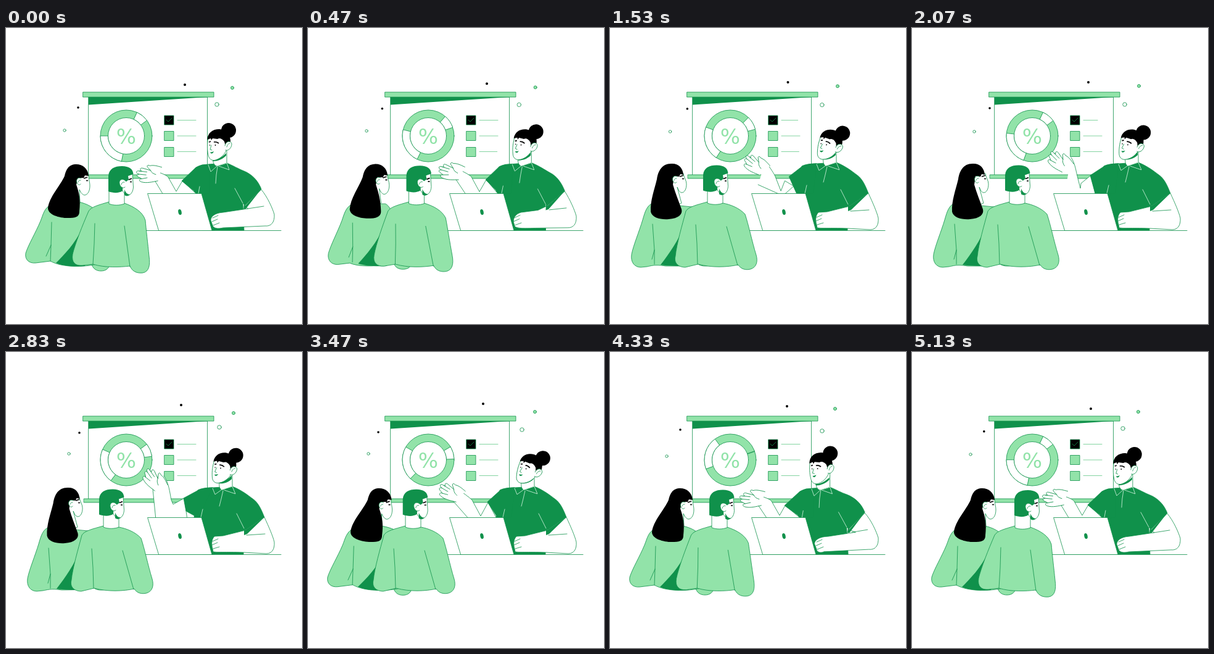
Write an HTML page that moves like this. It is 480 px wide and 480 px high and loops after 5.17 s.

```html
<!DOCTYPE html>
<html lang="en">
<head>
<meta charset="utf-8">
<title>Presentation</title>
<style>
html, body { margin: 0; width: 100%; height: 100%; overflow: hidden; background: #fff; }
svg { display: block; width: 100vw; height: 100vh; }
.s { stroke: #10914b; stroke-width: .8; stroke-linejoin: round; stroke-linecap: round; }
.w { fill: #fff; }
.l { fill: #92e3a9; }
.d { fill: #10914b; }
.k { fill: #000; }
.n { fill: none; }
.c { stroke: #d9f6e2; }
.b { stroke: #000; stroke-width: 1.7; }
text { font: 34px "DejaVu Sans", sans-serif; text-anchor: middle; }
</style>
</head>
<body>
<svg viewBox="0 0 480 480">
  <!-- screen -->
  <path class="w s" d="M134 112H326.5V240H134Z"/>
  <path class="d" d="M134 112H326L134 124.5Z"/>
  <path class="l s" d="M125 104H337V112H125ZM126.500 238H337V244H126.500Z"/>
  <circle class="l s" cx="195" cy="175" r="42"/>
  <path class="w s" id="gap1"/><path class="w s" id="gap2"/>
  <circle class="w s" cx="195" cy="175" r="29.5"/>
  <text class="l" x="195" y="187.5">%</text>
  <path class="k s" d="M257 142h15v15h-15Z"/>
  <path class="l s" d="M257 167.500h15v15h-15ZM257 193.500h15v15h-15Z"/>
  <path class="n s" d="M260 149l3 3 6-6"/>
  <path class="n s" id="rows" style="stroke:#65c98a"/>

  <!-- floating dots -->
  <circle class="k" id="dot1" r="2"/><circle class="l s" id="dot2" r="2.5"/>
  <circle class="w s" id="dot3" r="3.200"/><circle class="k" id="dot4" r="1.800"/>
  <circle class="w s" id="dot5" r="2.200"/>

  <!-- presenter -->
  <path class="d s" id="torso"/>
  <path class="w s" id="arm"/>
  <path class="d s" id="sleeve"/>
  <path class="w s" id="neck"/>
  <path class="d" id="neckShade"/>
  <path class="n s c" id="seams"/>
  <g id="hand">
    <path class="w s" d="M-6 4C-10-4-15-12-15-21C-15-26-11-26-10-22L-9-26C-9-32-5-32-4-28L-4-30C-3-35 1-34 1-29L2-26C4-30 7-29 7-25L7-12L10-17C12-21 15-19 14-15C17-10 17-3 17 4"/>
    <path class="n s" d="M7-12C4-10 3-6 3-2M-10-22L-6-14M-4-28L-2-17M1-29L3-17"/>
  </g>
  <g id="head">
    <circle class="k" cx="361" cy="166" r="12"/>
    <path class="w s" d="M328 176C326 188 326 197 328 206C329 212 333 215 338 214.500C346 213 353 207 357 199L360 176Z"/>
    <path class="k" d="M326.500 181C327 170 335 164 346 164C358 165 365 173 364 187L357 195L354 184C350 179 346 178 343 180L335 179L333 182L332 179Z"/>
    <path class="w s" d="M355 191C356 183 365 182 366 188C366 194 361 200 356 198"/>
    <path class="n s" d="M358 193C359 189 361 187 363 187M333 190L331 197L334 198"/>
    <path class="n b" d="M337 185Q341 184 345 187M329 185L332 184"/>
    <circle class="k" cx="339.500" cy="190" r=".9"/><circle class="k" cx="330.500" cy="190" r=".8"/>
    <path class="d" d="M331 201.500Q334 201.500 337 200Q335 205 332 203Z"/>
  </g>

  <!-- table and laptop -->
  <path class="n s" d="M225 328.500H446"/>
  <path class="d s" d="M316 268L321 269L338 328H332Z"/>
  <path class="w s" d="M230 268.500H317L334 328.500H248Z"/>
  <ellipse class="d" cx="282" cy="298.500" rx="2.700" ry="4.600" transform="rotate(-12 282 298.500)"/>
  <path class="w s" id="rest"/>
  <path class="d" id="cuff"/>
  <path class="n s" id="restLines"/>

  <!-- audience: woman -->
  <path class="l s" id="wElbow"/>
  <path class="l s" id="wBody"/>
  <path class="d" id="wShade"/>
  <path class="n s" id="wLines"/>
  <path class="w s" id="wFace"/>
  <path class="k" id="wHair"/>
  <g id="wDetail">
    <path class="w s" d="M122 244C117 241 113 246 115 251C117 255 120 255 121 253"/>
    <path class="n s" d="M117 250Q118 246 121 247"/>
    <path class="n b" d="M126 244L132 242M130 247.500H133"/>
  </g>

  <!-- audience: man -->
  <path class="l s" id="mBody"/>
  <path class="n s" id="mLines"/>
  <path class="w s" id="mNeck"/>
  <g id="mHead">
    <path class="w s" d="M185 240L205 236L206.500 258C206 267 201 273 194 271L189 264Z"/>
    <path class="d" d="M192 262C194 267 197 270 201 270C198 273 195 273 192 271Z"/>
    <path class="d" d="M166 265V240C167 228 176 224 188 224C200 224 206 229 206.500 237L198 240L199 246L195 249L190 247L189 264C184 268 174 268 166 265Z"/>
    <path class="w s" d="M194 248C189 243 183 246 184 252C185 258 190 261 193 258"/>
    <path class="n s" d="M187 254Q188 249 192 250"/>
    <path class="n b" d="M199 246L204 244M201 249.500H204"/>
  </g>
</svg>
<script>
const LOOP = 5170;
const POSES = [0, 1030, 2070, 2830, 3470, 4330];
const $ = id => document.getElementById(id);
const NUM = /-?\d+(\.\d+)?/g;
const nums = s => String(s).match(NUM).map(Number);

// Periodic curve through keys; flat at extremes so it never overshoots.
function curve(vals, times = POSES) {
  const n = vals.length;
  const val = i => vals[(i + n) % n];
  const time = i => times[(i + n) % n] + LOOP * Math.floor(i / n);
  const rate = i => (val(i + 1) - val(i)) / (time(i + 1) - time(i));
  const slope = i => {
    const a = rate(i - 1), b = rate(i);
    return a * b <= 0 ? 0 : 2 * a * b / (a + b);
  };
  return t => {
    let i = n - 1;
    while (times[i] > t) i--;
    const h = time(i + 1) - time(i), u = (t - time(i)) / h, v = 1 - u;
    return val(i) * v * v * (1 + 2 * u) + val(i + 1) * u * u * (3 - 2 * u)
      + h * u * v * (slope(i) * v - slope(i + 1) * u);
  };
}

// Strings of the same shape, one per pose.
function keyed(...strings) {
  const rows = strings.map(nums);
  const curves = rows[0].map((_, k) => curve(rows.map(r => r[k])));
  return t => {
    let k = 0;
    return strings[0].replace(NUM, () => curves[k++](t).toFixed(2));
  };
}

// Blend of two strings, steered by a weight curve.
function blend(weight, from, to) {
  const a = nums(from), b = nums(to);
  return t => {
    const w = weight(t);
    const mixed = a.map((v, k) => v + (b[k] - v) * w);
    let k = 0;
    return from.replace(NUM, () => mixed[k++].toFixed(2));
  };
}

function ringGap(from, to) {
  const a = curve(from), b = curve(to);
  const at = (deg, r) => {
    const q = deg * Math.PI / 180;
    return `${195 + r * Math.sin(q)} ${175 - r * Math.cos(q)}`;
  };
  return t => {
    const p = a(t), q = b(t);
    return `M${at(p, 42)}A42 42 0 0 1 ${at(q, 42)}L${at(q, 29.5)}A29.5 29.5 0 0 0 ${at(p, 29.5)}Z`;
  };
}

const lean = curve([0, 1, 1, 1, 1, -.15]);
const woman = curve([0, 1, 1, -.05, 0], [0, 1180, 2800, 3500, 4250]);
const man = curve([0, 1, 1, .22], [0, 1100, 3450, 4330]);
const manHead = curve([0, 1, 1, 1, .82, .33]);
const hairSway = curve([0, 0, -2, -.5, 1, 0]);

const paths = {
  gap1: ringGap([25, 63, 25, 53, 60, 70.5], [53, 94, 54, 82, 88, 71]),
  gap2: ringGap([191, 225, 200, 217, 224, 250], [270, 302, 276, 294, 300, 324]),
  rows: keyed(...[[308, 308, 308], [308, 308, 305], [301, 308, 308], [308, 308, 308], [308, 308, 308], [308, 308, 307]]
    .map(([a, b, c]) => `M278 149.5L${a} 149.5M278 175L${b} 175M278 200.5L${c} 200.5`)),

  torso: blend(lean,
    "M328 221C318 222 312 223 308 227L305 268L318 328L386 328L384 284L388 288L414 261C408 246 398 237 386 232C378 229 368 223 358 219Z",
    "M335 220C325 220 317 221 311 224L305 268L318 328L385 328L386 285L388 289L419 268C414 255 409 244 400 238C392 232 382 224 367 218Z"),
  sleeve: keyed(
    "M318 222L308 226L285 248L312 270L330 268L330 222Z",
    "M322 221L312 224L291 243L307 268L330 268L335 220Z",
    "M322 221L312 224L289 239L297 268L330 268L335 220Z",
    "M322 221L312 224L288 237L292 258L312 269L335 220Z",
    "M322 221L312 224L291 243L307 268L330 268L335 220Z",
    "M318 222L308 226L283 249L312 270L330 268L330 222Z"),
  arm: keyed(
    "M240 231C250 235 260 238 263 242L276 265L286 248L312 272L256 272L241 247",
    "M245 222C250 226 263 236 267 240L280 266L292 244L307 272L262 272L234 238",
    "M258 210C264 218 266 232 268 240L273 260L274 252L290 239L298 272L247 272L237 226",
    "M256 201C264 211 266 230 268 240L271 247L289 237L294 272L243 272L238 222",
    "M243 223C250 227 262 236 266 240L280 266L292 244L307 272L262 272L233 239",
    "M239 232C249 235 259 238 262 242L275 265L284 249L312 272L256 272L240 248"),
  neck: blend(lean,
    "M335 206L336 218C338 222 340 224 342 224L358 219L358 196",
    "M345 206L346 218C347 222 349 224 351 224L367 218L367 196"),
  neckShade: blend(lean,
    "M334 213C342 214 350 210 357 203L357 207C351 213 343 216 336 216Z",
    "M344 208C352 209 360 207 366 200L366 206C360 212 352 214 346 213Z"),
  seams: blend(lean,
    "M328 222L332 233L342 224L358 219L362 230L345 224M343 225L341 238L340 252M371 260L384 284M314 257L312 268",
    "M335 221L339 231L350 223L367 218L372 230L354 224M352 225L349 238L346 250M374 262L386 286M319 255L316 268"),
  rest: blend(lean,
    "M387 288L414 262C424 274 432 292 435 302C436 315 430 322 420 321L352 324C344 326 336 325 335 320L332 312C332 306 338 300 352 299L392 293Z",
    "M388 289L419 268C426 283 433 299 435 308C436 320 431 327 422 327L386 325L352 324C344 325 336 324 335 319L333 312C333 304 338 299 352 298L390 297Z"),
  cuff: blend(lean,
    "M386 285L388 288L414 261L389 293L385 294Z",
    "M386 285L388 289L419 268L391 295L386 297Z"),
  restLines: blend(lean,
    "M392 293L418 289M335 308L344 304M334 314L343 310M336 320L346 316",
    "M390 297L420 295M335 307L344 303M334 313L343 309M336 319L346 316"),

  wElbow: blend(woman,
    "M138 380C140 391 147 394 154 394C162 394 168 390 169 380Z",
    "M138 374C140 384 147 386 154 386C162 386 168 384 169 374Z"),
  wBody: blend(woman,
    "M72 287C62 292 60 303 56 313C48 332 36 352 32 365C30 376 38 382 48 381L72 378C90 388 124 389 152 382L150 300C142 291 132 285 118 282Z",
    "M70 284C60 287 57 297 53 311C47 331 38 352 35 367C33 380 40 388 50 388C60 387 66 386 72 383C90 386 120 386 150 384L148 300C140 291 132 286 114 282Z"),
  wShade: blend(woman,
    "M124 324C112 350 94 368 81 381C95 387 112 387 128 386Z",
    "M122 318C110 346 96 366 82 384C95 386 112 386 128 386Z"),
  wLines: blend(woman,
    "M74 315L73 352L65 370M73 352L72 378",
    "M69 318L72 360L68 375M72 360L72 383"),
  wFace: blend(woman,
    "M112 240L134 238C134 246 136 250 136 256C136 265 132 271 127 271C123 270 121 266 119 262L120 284L108 290Z",
    "M98 238L119 236C120 243 124 247 124 253C124 261 121 267 116 267C112 266 111 262 109 258L116 284L100 290Z"),
  wHair: blend(woman,
    "M134 240C133 227 123 220 112 221C100 222 97 232 95 240C88 256 70 274 68 292C68 304 90 309 104 308C116 308 119 304 119 297C121 280 119 268 114 254L117 243L126 243L128 239Z",
    "M120 238C119 226 111 219 100 220C85 220 79 232 77 245C73 262 66 280 67 298C69 308 84 311 96 310C112 309 119 302 117 294C112 280 107 268 103 254L105 240L113 241L115 237Z"),

  mBody: blend(man,
    "M167 282C150 287 138 290 134 297C124 320 112 350 108 367C106 380 112 386 124 385L141 383C160 389 185 388 201 386C205 396 214 398 222 397C232 395 234 385 232 370C230 350 227 325 226 312C222 298 208 290 192 284Z",
    "M158 282C140 287 127 290 123 297C117 320 108 350 106 370C103 382 112 388 122 388L143 383C165 389 190 388 208 384C212 391 220 393 228 391C238 388 240 378 237 368C230 345 225 320 219 302C210 292 195 286 183 284Z"),
  mLines: blend(man,
    "M144 317L143 350L141 383M192 321L201 387",
    "M139 319L141 350L142 383M189 322L207 385"),
  mNeck: blend(man,
    "M167 258L167 285C174 288 184 288 192 285L192 264",
    "M158 258L158 284C165 287 176 287 183 284L183 264")
};

const moves = {
  hand: keyed("translate(244 241)rotate(-74)", "translate(242 235)rotate(-47)", "translate(246 227)rotate(-35)",
    "translate(245 219)rotate(-25)", "translate(241 236)rotate(-49)", "translate(243 242)rotate(-75)"),
  head: keyed("translate(0 0)rotate(0 345 215)", "translate(6 0)rotate(14 345 215)", "translate(6 0)rotate(10 345 215)",
    "translate(5 -1)rotate(8 345 215)", "translate(7 0)rotate(16 345 215)", "translate(-2 -1)rotate(-2 345 215)"),
  wHair: t => `translate(${hairSway(t)} 0)`,
  wDetail: blend(woman, "translate(0 0)", "translate(-13 -3)"),
  mHead: blend(manHead, "translate(0 0)", "translate(-15 -1.5)"),
  dot1: keyed("translate(290 92)", "translate(290 88)", "translate(286 88)", "translate(284 86)", "translate(284 84)", "translate(287 88)"),
  dot2: keyed("translate(367 97)", "translate(370 95)", "translate(368 94)", "translate(369 99)", "translate(368 97)", "translate(365 92)"),
  dot3: keyed("translate(342 124)", "translate(343 125)", "translate(345 124)", "translate(346 122)", "translate(347 126)", "translate(344 128)"),
  dot4: keyed("translate(117 129)", "translate(124 132)", "translate(126 130)", "translate(119 131)", "translate(114 130)", "translate(114 126)"),
  dot5: keyed("translate(95 166)", "translate(95 168)", "translate(101 168)", "translate(102 165)", "translate(98 165)", "translate(92 169)")
};

function draw(now) {
  const t = now % LOOP;
  for (const id in paths) $(id).setAttribute("d", paths[id](t));
  for (const id in moves) $(id).setAttribute("transform", moves[id](t));
}

const start = performance.now();
function frame() {
  draw(performance.now() - start);
  requestAnimationFrame(frame);
}
frame();
</script>
</body>
</html>
```
